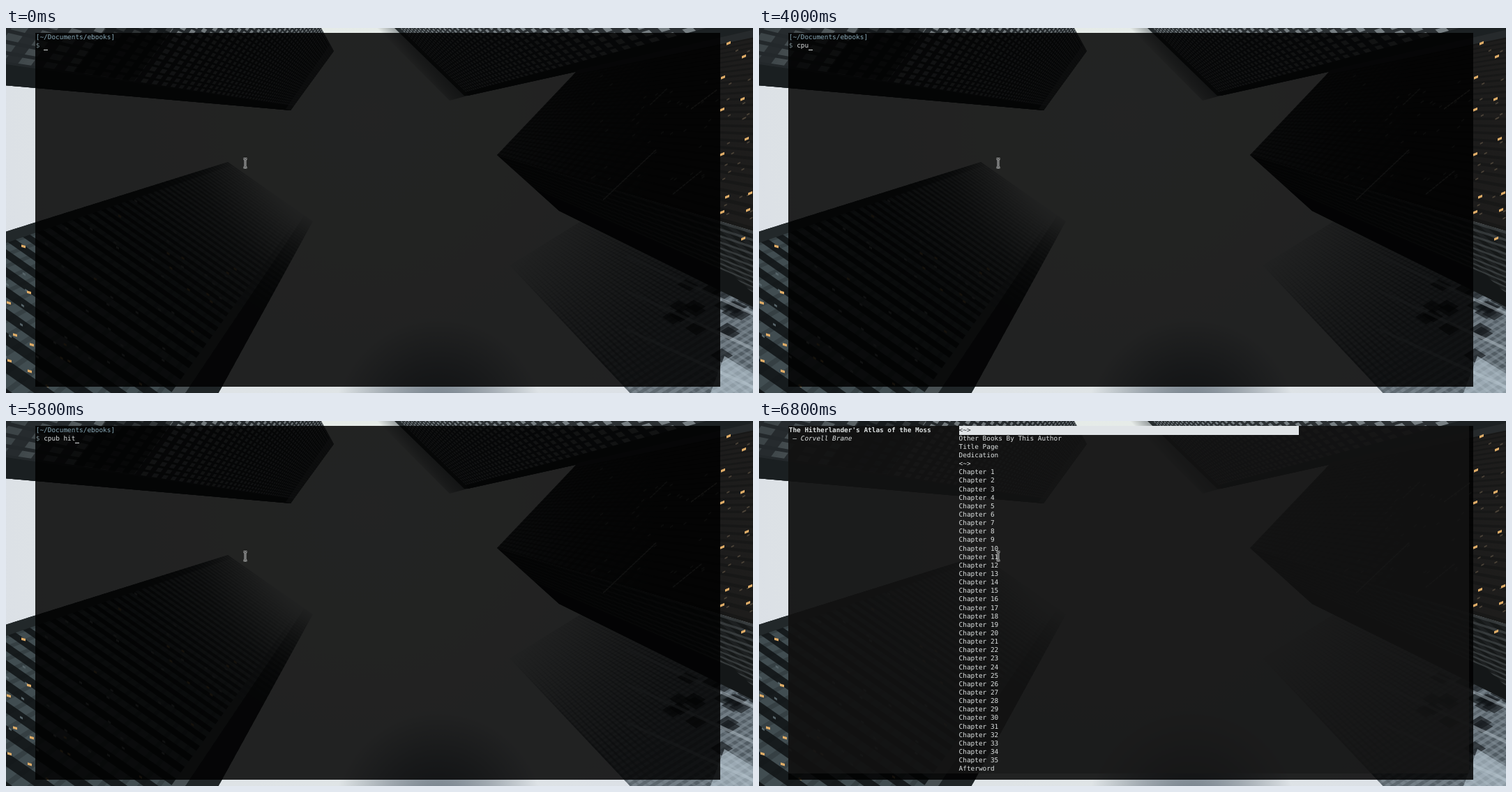
An HTML page with a canvas for the animation above (8 s loop, 1071 px wide and 523 px high).

```html
<!DOCTYPE html>
<html lang="en">
<head>
<meta charset="utf-8">
<title>Terminal e-book reader</title>
<style>
html, body { margin: 0; width: 100%; height: 100%; overflow: hidden; background: #dfe3e8; }
canvas, pre, svg, div { position: absolute; left: 0; top: 0; margin: 0; }
pre {
  font: 9.42px/12.14px "DejaVu Sans Mono", monospace;
  text-rendering: geometricPrecision;
  color: #dde1e1; left: 42.8px; top: 7.6px;
}
#path { color: #88a8b6; }
#sign { color: #75868c; }
#cursor { width: 5.7px; height: 1px; background: #dde1e1; }
#veil { left: 42px; top: 7px; width: 976px; height: 498px; background: rgba(25, 25, 25, .66); }
#bar { left: 286.6px; top: 7.4px; width: 487.8px; height: 12.2px; background: #e0e4e7; }
#toc { left: 286.6px; }
#toc span { color: #25292a; }
</style>
</head>
<body>
<canvas id="scene" width="1071" height="523"></canvas>
<div id="shell">
  <pre><span id="path">[~/Documents/ebooks]</span>
<span id="sign">$</span> <span id="typed"></span></pre>
  <div id="cursor"></div>
</div>
<div id="reader">
  <div id="veil"></div>
  <div id="bar"></div>
  <pre><b>The Hitherlander's Atlas of the Moss</b>
 <i>– Corvell Brane</i></pre>
  <pre id="toc"></pre>
</div>
<svg width="1071" height="523" fill="none">
  <defs><path id="beam" d="M340.5 187.5h2l.5.5.5-.5h2M343 188v11.5M340.5 200h2l.5-.5.5.5h2"/></defs>
  <use href="#beam" stroke="#e8eaea" stroke-width="2.7"/>
  <use href="#beam" stroke="#080808"/>
</svg>
<script>
const $ = id => document.getElementById(id);
const c = $('scene').getContext('2d');
const zenith = [522, 128];

let seed = 7;
const rnd = () => (seed = seed * 16807 % 2147483647) / 2147483647;
const mix = (p, q, t) => [p[0] + (q[0] - p[0]) * t, p[1] + (q[1] - p[1]) * t];
const out = (p, s) => mix(zenith, p, s);

function poly(color, ...pts) {
  c.fillStyle = color;
  c.beginPath();
  pts.forEach(p => c.lineTo(...p));
  c.fill();
}

// Part of a wall: u runs along the roof edge, s away from the zenith.
const patch = (w, color, u0, u1, s0, s1) => {
  const a = mix(w.p, w.q, u0), b = mix(w.p, w.q, u1);
  poly(color, out(a, s0), out(b, s0), out(b, s1), out(a, s1));
};

function wall(w) {
  patch(w, w.base, 0, 1, 1, 6);
  for (let h = 1; h > .17; h -= w.step)
    patch(w, w.floor, 0, 1, 1 / h, 1 / (h - w.step * .5));
  for (let j = 0; j < w.cols; j++)
    patch(w, w.column, j / w.cols, (j + .35) / w.cols, 1, 6);
}

function radial(x, y, r0, r1, ...colors) {
  const g = c.createRadialGradient(x, y, r0, x, y, r1);
  colors.forEach((k, i) => g.addColorStop(i / (colors.length - 1), k));
  return g;
}
const halo = (...args) => radial(...zenith, ...args);

function lamp(x, y, w = 6, h = 3.5, color = '#e0ad68', tilt = .3) {
  poly(color, [x - w / 2, y - h / 2], [x + w / 2, y - h / 2 + w * tilt],
    [x + w / 2, y + h / 2 + w * tilt], [x - w / 2, y + h / 2]);
}

function streak(x0, y0, x1, y1, n, color) {
  for (let i = 0; i < n; i++) lamp(...mix([x0, y0], [x1, y1], i / n), 4, 2, color, -.7);
}

function drawScene() {
  c.fillStyle = halo(0, 560, '#e9efea', '#e2e7e6', '#dbe0e6');
  c.fillRect(0, 0, 1071, 523);
  c.fillStyle = radial(620, 565, 20, 150, 'rgba(70,84,98,.75)', 'rgba(70,84,98,.4)', 'rgba(70,84,98,0)');
  c.fillRect(440, 400, 360, 123);

  // upper left tower
  const west = { p: [408, 118], q: [470, 33], step: .0165, cols: 30,
    base: '#262b2e', floor: halo(100, 520, '#6a7174', '#757c7f', '#3c4447'), column: '#23282b' };
  wall(west);
  patch(west, '#1a1f21', 0, .07, 1, 6);
  patch(west, 'rgba(16,19,21,.65)', .08, .75, 3.1, 3.9);
  poly('rgba(96,102,104,.6)', [408, 118], [470, 33], [464, 24], [401, 116]);

  // upper tower
  const north = { p: [662, 97], q: [562, 0], step: .018, cols: 30,
    base: '#2b3033', floor: '#777f83', column: '#2b3033' };
  wall(north);
  patch(north, '#1c2123', 0, .05, 1, 6);
  const rim = c.createLinearGradient(586, 62, 609, 42);
  rim.addColorStop(0, '#e4e9e6');
  rim.addColorStop(.5, '#a8aeae');
  rim.addColorStop(1, '#80888a');
  poly(rim, [636, 104], [532, 0], [562, 0], [662, 97]);
  poly('#262c2e', [664, 97], [564, 0], [557, 0], [657, 97]);

  // lower right glass tower, fading into haze
  const glass = { p: [722, 340], q: [860, 255], step: .009, cols: 34,
    base: halo(275, 680, 'rgba(170,178,180,0)', '#a7aeb1', '#77828a', '#66727a'),
    floor: halo(300, 680, 'rgba(45,54,60,0)', 'rgba(45,54,60,.25)', 'rgba(35,44,50,.4)'),
    column: halo(290, 680, 'rgba(40,48,54,0)', 'rgba(40,48,54,.4)', 'rgba(176,190,200,.35)') };
  wall(glass);
  for (let i = 0; i < 22; i++) {
    const u = .4 + rnd() * .35, s = 1.5 + rnd() * .45;
    patch(glass, 'rgba(14,18,20,.6)', u, u + .06, s, s + .06);
  }
  for (const y of [325, 375, 430])
    poly('rgba(170,182,190,.5)', [890, y], [1071, y + 82], [1071, y + 87], [890, y + 4]);
  poly('rgba(196,212,222,.55)', [1010, 523], [1030, 470], [1071, 495], [1071, 523]);

  // dark tower on the right
  const dark = { p: [704, 182], q: [820, 60], step: .02, cols: 28,
    base: halo(180, 560, '#393e40', '#1f2122', '#1b1b1b', '#1e1d1c'),
    floor: halo(180, 420, 'rgba(86,93,96,.6)', 'rgba(50,55,58,0)'), column: 'rgba(16,18,19,.45)' };
  wall(dark);
  patch(dark, '#262a2c', .94, 1, 1, 6);
  const under = { p: [704, 182], q: [793, 262], step: .018, cols: 14,
    base: '#1d2021', floor: 'rgba(14,16,17,.5)',
    column: halo(230, 560, 'rgba(70,76,78,.3)', 'rgba(76,82,84,.55)') };
  wall(under);
  patch(under, '#141718', .6, 1, 1, 2.2);
  streak(858, 246, 934, 174, 20, '#6f7270');
  streak(958, 238, 1000, 204, 9, '#666968');
  streak(984, 116, 1022, 88, 8, '#75746c');
  streak(925, 110, 950, 86, 6, '#585b5a');
  for (let i = 0; i < 40; i++) lamp(840 + rnd() * 180, 70 + rnd() * 160, 4, 2, '#4c4e4c', -.7);
  for (let i = 0; i < 24; i++) lamp(1027 + rnd() * 42, 25 + rnd() * 250, 4, 2, '#4b4338', -.5);

  // lower left tower, its roof lost in haze
  const south = { p: [318, 192], q: [440, 277], step: .0165, cols: 22,
    base: halo(160, 460, 'rgba(80,90,92,0)', 'rgba(72,82,85,.72)', '#465255', '#414d51'),
    floor: halo(180, 400, 'rgba(18,22,24,0)', 'rgba(18,22,24,.55)', '#161b1d'),
    column: halo(180, 500, 'rgba(14,18,20,0)', 'rgba(14,18,20,.15)', 'rgba(14,18,20,.22)') };
  wall(south);
  patch(south, halo(200, 340, 'rgba(30,36,38,0)', '#22282a'), 0, .05, 1, 6);
  patch(south, halo(190, 340, 'rgba(80,88,90,0)', '#485053'), .86, .9, 1, 6);
  patch(south, halo(165, 320, 'rgba(28,33,35,0)', '#1f2527'), .9, 1, 1, 6);
  for (let i = 0; i < 70; i++) {
    const [x, y] = out(mix(south.p, south.q, .06 + rnd() * .74), 1.7 + rnd() * 1.8);
    lamp(x, y, 4, 3, x < 42 ? '#57656a' : rnd() < .25 ? '#94764d' : '#697173', .6);
  }

  const lamps = [
    25, 312, 33, 378, 4, 393, 13, 439, 37, 453, 5, 476, 34, 491,
    1036, 23, 1058, 42, 1028, 72, 1056, 103, 1027, 118, 1062, 160,
    1027, 182, 1034, 243, 1067, 238, 1027, 265, 1064, 262, 1057, 303
  ];
  for (let i = 0; i < lamps.length; i += 2) {
    const x = lamps[i];
    lamp(x, lamps[i + 1], 6, 3.5, '#e0ad68', x < 500 ? .3 : -.4);
  }

  // terminal window
  c.fillStyle = 'rgba(0,0,0,.85)';
  c.fillRect(42, 7, 982, 507);
}

const full = 'cpub hitherlands_atlas-corvell_brane.epub ';
// start time, typed characters, cursor column (-1 hides it), cursor row
const steps = [
  [0, 0, 2, 1], [200, 0, -1, 1], [800, 0, 2, 1], [1400, 0, -1, 1], [2000, 0, 2, 1],
  [4000, 3, 5, 1], [4100, 4, 6, 1], [4400, 5, 7, 1], [4900, 5, -1, 1],
  [5200, 6, 8, 1], [5600, 7, 9, 1], [5800, 8, 10, 1],
  [6100, full.length, 44, 1], [6500, full.length, 0, 2]
];

const chapters = Array.from({ length: 35 }, (_, i) => 'Chapter ' + (i + 1));
$('toc').innerHTML = ['<span>&lt;~&gt;</span>', 'Other Books By This Author', 'Title Page',
  'Dedication', '&lt;~&gt;', ...chapters, 'Afterword'].join('\n');

function frame(now) {
  const t = now % 8000, reading = t >= 6800;
  $('shell').hidden = reading;
  $('reader').hidden = !reading;
  const [, count, col, row] = steps.findLast(s => s[0] <= t);
  $('typed').textContent = full.slice(0, count);
  const style = $('cursor').style;
  style.visibility = col < 0 ? 'hidden' : 'inherit';
  style.left = 42.7 + col * 5.67 + 'px';
  style.top = 19 + row * 12 + 'px';
  requestAnimationFrame(frame);
}

drawScene();
requestAnimationFrame(frame);
</script>
</body>
</html>
```
